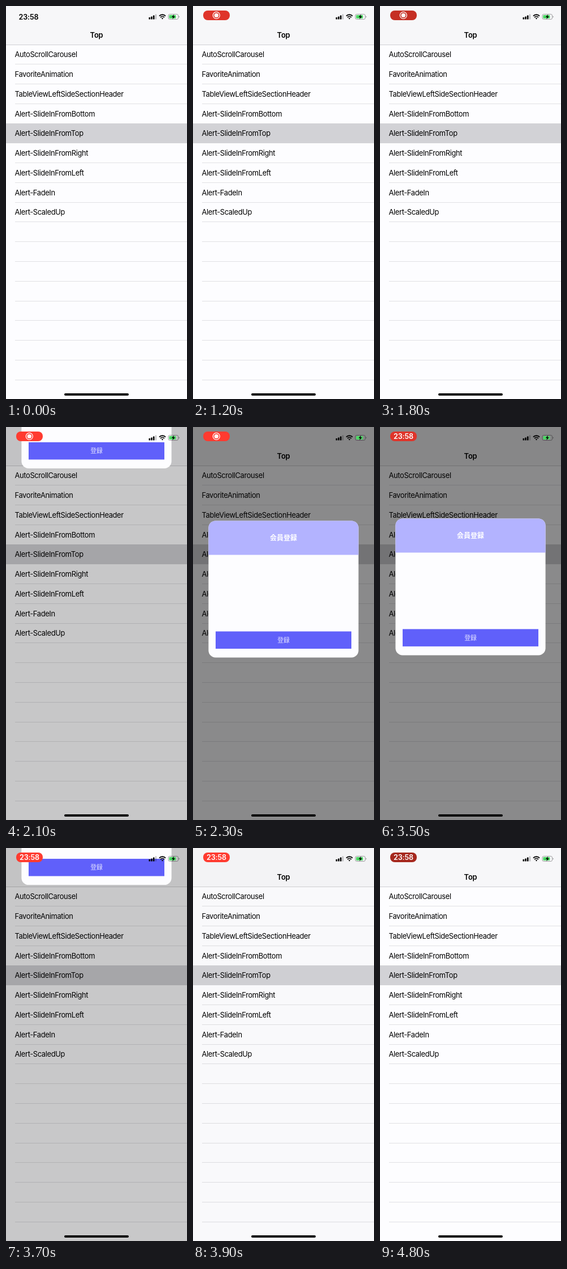
Animation, 320 px wide and 693 px high, one loop 4900 ms. Source, as an HTML page:

```html
<!DOCTYPE html>
<html lang="ja">
<head>
<meta charset="utf-8">
<title>Top</title>
<style>
  html, body { margin: 0; width: 100%; height: 100%; overflow: hidden; background: #fdfdff; }
  svg { display: block; width: 320px; height: 693px; }
  text { font-family: Inter, Roboto, sans-serif; fill: #000; }
  .row { font-size: 12.9px; letter-spacing: -.36px; }
  .title { font-size: 12.9px; font-weight: 600; letter-spacing: -.2px; text-anchor: middle; }
  .time { font-size: 12.6px; font-weight: 600; letter-spacing: -.1px; text-anchor: middle; }
  .jp { font-family: "Noto Sans CJK JP", "Noto Sans CJK", sans-serif; text-anchor: middle; }
</style>
</head>
<body>
<svg viewBox="0 0 320 693">
  <rect width="320" height="693" fill="#fdfdff"/>
  <rect width="320" height="68" fill="#f7f7f9"/>
  <g id="list"></g>
  <text class="title" x="160" y="55.5">Top</text>
  <rect id="dim" width="320" height="693" opacity="0"/>

  <g id="modal">
    <rect x="27.4" width="265.2" height="241" rx="12.4" fill="#fdfdff"/>
    <path d="M27.4 60V12.4a12.4 12.4 0 0 1 12.4-12.4H280.2a12.4 12.4 0 0 1 12.4 12.4V60Z" fill="#b3b3ff"/>
    <text class="jp" x="160" y="34.5" font-size="12" font-weight="700" style="fill:#fff">会員登録</text>
    <rect x="40" y="195" width="240" height="30.5" fill="#6060fa"/>
    <text class="jp" x="160" y="214.4" font-size="10.8" style="fill:#e6e6ff">登録</text>
  </g>

  <text id="clock" class="time" x="40" y="23.5">23:58</text>
  <g id="pill">
    <rect id="pillBox" x="18" y="8" width="47" height="17" rx="8"/>
    <g id="record">
      <circle cx="41.3" cy="16.4" r="6" fill="none" stroke="#fff" stroke-width="1.3"/>
      <circle cx="41.3" cy="16.4" r="3.7" fill="#fff"/>
    </g>
    <text id="pillTime" class="time" x="41.5" y="21" style="fill:#fff">23:58</text>
  </g>

  <g>
    <rect x="252.5" y="20" width="2.6" height="3.5" rx=".6"/>
    <rect x="256.2" y="18.5" width="2.6" height="5" rx=".6"/>
    <rect x="259.9" y="16.5" width="2.6" height="7" rx=".6"/>
    <rect x="263.6" y="14.5" width="2.6" height="9" rx=".6" opacity=".22"/>
  </g>
  <g fill="none" stroke="#000" stroke-width="1.9">
    <path d="M270.9 17.6a8 8 0 0 1 11.2 0"/>
    <path d="M273.1 20a4.9 4.9 0 0 1 6.8 0"/>
    <path d="M276.5 23.6l-1.7-1.9a2.5 2.5 0 0 1 3.4 0Z" fill="#000" stroke="none"/>
  </g>
  <g opacity=".4">
    <rect x="287" y="14.5" width="17.5" height="9" rx="2.6" fill="none" stroke="#000" stroke-width=".9"/>
    <path d="M305.6 17.5v3q1.2-.4 1.2-1.5t-1.2-1.5"/>
  </g>
  <rect x="288.4" y="15.9" width="12" height="6.2" rx="1.4" fill="#4cd964"/>
  <path d="M297.2 14.8l-4.6 4.8h2.8l-1.2 3.7 4.9-5h-2.9Z"/>

  <rect x="103" y="683" width="114" height="4" rx="2"/>
</svg>
<script>
const LOOP = 4900, STEP = 100;
const TOP = 68, ROW = 34.77, SELECTED = 4;
const SLIDE = { enter: 1824, leave: 3372, length: 600, rest: 226, travel: 693 };
const PULSE = { peak: 2350, period: 1600, dark: [165, 40, 30], bright: [255, 59, 48] };
const DIM = .5;
const names = ['AutoScrollCarousel', 'FavoriteAnimation', 'TableViewLeftSideSectionHeader',
  'Alert-SlideInFromBottom', 'Alert-SlideInFromTop', 'Alert-SlideInFromRight',
  'Alert-SlideInFromLeft', 'Alert-FadeIn', 'Alert-ScaledUp'];

const $ = id => document.getElementById(id);
const clamp = v => Math.max(0, Math.min(1, v));
const mix = (a, b, p) => `rgb(${a.map((v, i) => Math.round(v + (b[i] - v) * p))})`;

function add(tag, attrs, text = '') {
  const el = document.createElementNS('http://www.w3.org/2000/svg', tag);
  for (const key in attrs) el.setAttribute(key, attrs[key]);
  el.textContent = text;
  $('list').appendChild(el);
}

// cubic-bezier(.42, 0, .58, 1), solved by bisection
function ease(x) {
  if (x <= 0 || x >= 1) return clamp(x);
  let lo = 0, hi = 1;
  for (let i = 0; i < 24; i++) {
    const s = (lo + hi) / 2, r = 1 - s;
    if (3 * r * r * s * .42 + 3 * r * s * s * .58 + s ** 3 < x) lo = s; else hi = s;
  }
  return lo * lo * (3 - 2 * lo);
}

for (let i = 1; i <= 17; i++) {
  add('rect', { x: 16, y: Math.floor(TOP + ROW * i), width: 304, height: 1, fill: '#e1e1e4' });
}
add('rect', { y: TOP, width: 320, height: 1, fill: '#d0d0d3' });
add('rect', { y: Math.floor(TOP + ROW * SELECTED), width: 320, height: 35, fill: '#d2d2d6' });
names.forEach((name, i) => add('text', { class: 'row', x: 15.5, y: TOP + ROW * i + 22.3 }, name));

function draw(t) {
  const shown = ease((t - SLIDE.enter) / SLIDE.length) - ease((t - SLIDE.leave) / SLIDE.length);
  const y = SLIDE.rest - SLIDE.travel * (1 - shown);
  $('modal').setAttribute('transform', `translate(0 ${y.toFixed(2)})`);
  $('dim').setAttribute('opacity', shown * DIM);

  const glow = (1 + Math.cos((t - PULSE.peak) / PULSE.period * 2 * Math.PI)) / 2;
  $('pillBox').setAttribute('fill', mix(PULSE.dark, PULSE.bright, Math.min(1, glow * 1.6)));

  const fade = clamp((t - 500) / 300);
  $('pill').setAttribute('opacity', fade);
  $('clock').setAttribute('opacity', 1 - fade);

  const swap = clamp((t - 3200) / 300);
  $('record').setAttribute('opacity', 1 - swap);
  $('pillTime').setAttribute('opacity', swap);
}

const start = performance.now();
function tick() {
  const t = (performance.now() - start) % LOOP;
  draw(Math.floor(t / STEP) * STEP);
  requestAnimationFrame(tick);
}
tick();
</script>
</body>
</html>
```
